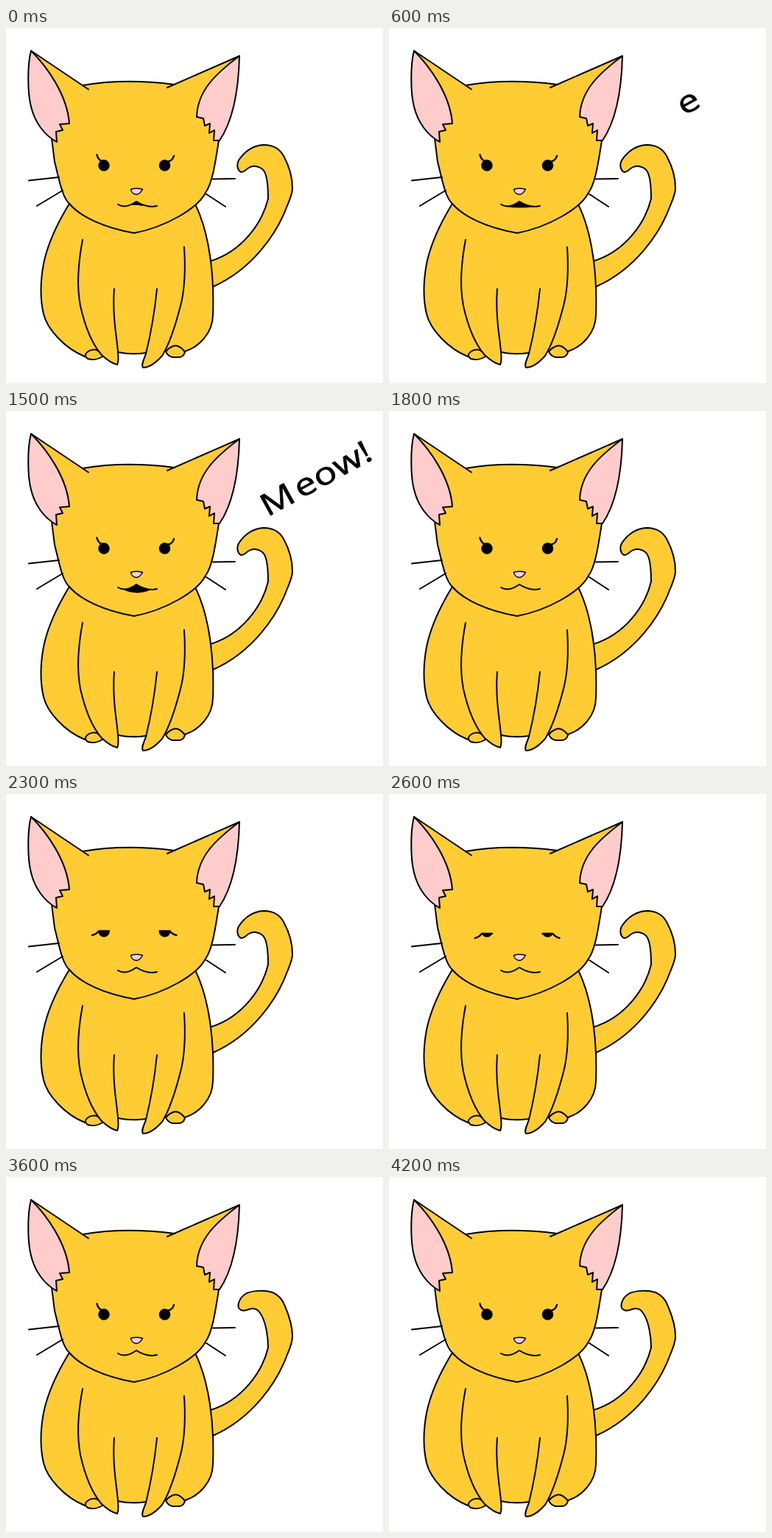
Recreate the animation shown at these times as an HTML page. Size 512 by 483 pixels, loop 4.5 s.

```html
<!DOCTYPE html>
<html lang="en">
<head>
<meta charset="utf-8">
<title>Meowing cat</title>
<style>
  html, body { margin: 0; width: 100%; height: 100%; overflow: hidden; background: #fff; }
  svg { display: block; width: 100vw; height: 100vh; }
  .line { fill: none; }
  .fur { fill: #fc3; }
  .pink { fill: #fcc; }
  text { font: 42px "Open Sans", "Noto Sans", sans-serif; fill: #000; stroke-width: .6; }
  tspan:first-child { letter-spacing: 4px; }
</style>
</head>
<body>
<svg viewBox="0 0 512 483" fill="none" stroke="#000" stroke-width="2" stroke-linecap="round" stroke-linejoin="round">
  <path id="tail" class="fur"/>

  <g id="body">
    <path class="fur" stroke="none" d="M86 239C72 262 57 291 51 321C46 348 47 372 51 389C56 410 80 436 107 447L131 447L152 441Q170 445 190 442L217 440L243 440C262 434 281 415 281 390C283 340 277 280 257 240Z"/>
    <path class="line" d="M86 239C72 262 57 291 51 321C46 348 47 372 51 389C56 410 80 436 107 447M152 441Q170 445 190 442M243 440C262 434 281 415 281 390C283 340 277 280 257 240"/>
    <path class="fur" d="M108 444C112 437 122 436 126 440Q130 443 131 447C125 451 117 452 111 450Q107 447 108 444Z"/>
    <path class="fur" d="M217 440C222 434 229 431 234 433Q240 436 243 441Q241 448 234 448L226 448Q219 446 217 440Z"/>
    <path class="fur" d="M104 288C97 325 96 352 101 378C107 405 117 430 130 445Q142 456 151 458C154 452 152 440 150 422C147 400 145 378 147 355"/>
    <path class="fur" d="M242 298C244 330 243 352 238 374C231 402 222 430 212 446C204 455 194 462 186 462C183 458 188 450 190 443C197 415 202 385 205 355"/>
  </g>

  <g id="head">
    <path class="fur" stroke="none" d="M104 78C145 71 190 72 229 77L317 38L289 153C284 185 280 212 271 224C260 246 216 271 174 279C134 272 101 257 86 239C76 230 72 205 66 182L62 150L34 31Z"/>
    <path class="line" d="M104 78C145 71 190 72 229 77M289 153C284 185 280 212 271 224C260 246 216 271 174 279C134 272 101 257 86 239C76 230 72 205 66 182L62 150"/>
    <path class="pink" d="M34 31C55 52 83 90 86 130L73 131L77 139L68 141L69 155C52 146 39 128 34 107C29 88 29 50 34 31Z"/>
    <path class="pink" d="M317 38C316 80 309 125 290 153L282 153L283 139L276 143L277 130L270 133L268 123L259 121C260 85 285 62 317 38Z"/>
    <path class="line" d="M34 31L112 83.5M317 38L219 81"/>
    <path class="line" d="M31 207.5L72 203M42 242L77 221M281 205.5L311 205M272 226L298 243"/>
    <path fill="#fcd" stroke-width="1.5" d="M169.5 219.5Q177 217 185.5 219.5C183 224 181 226.5 177 226.5C173 226 170 223 169.5 219.5Z"/>
    <path class="line" d="M152 240C160 245 170 241 177 236C185 241 194 245 205 242"/>
    <path id="mouth" fill="#000" stroke="none"/>
    <path id="eyes" fill="#000" stroke="none"/>
    <path id="lids" class="line" stroke-width="2.4"/>
  </g>

  <text id="word" transform="translate(355 144.5) rotate(-28.7) scale(1.23 1)"><tspan>M</tspan><tspan>e</tspan><tspan>o</tspan><tspan>w</tspan><tspan>!</tspan></text>
</svg>
<script>
const LOOP = 4500;
const $ = id => document.getElementById(id);
const letters = [...$('word').children];

const tailTips = {
  low: 'C356 215 355 201 350 194C344 187 335 187 330 190C325 193 323 197 319 196C314 193 313 186 316 180C322 171 333 160 350 159C363 159 372 165 377 174C383 185 389 202 389 218',
  high: 'C356 218 353 196 345 185C341 179 336 178 330 180C325 182 319 183 316 178C314 172 318 163 327 158C337 154 352 154 362 157C371 161 376 167 379 176C385 190 389 205 389 217'
};
const tail = tip => 'M278 317C320 304 348 266 356 232' + tailTips[tip] +
  'C389 226 385 234 381 244C368 279 335 328 281 352';

const mouths = {
  shut: '',
  small: 'M170 241L177 236L187 242Q182 242 180 241Z',
  mid: 'M163 243L177 236L191 243Q177 244.5 163 243Z',
  wide: 'M158 243Q170 242 177 236Q185 242 199 243Q178 246 158 243Z',
  full: 'M158 242.5Q170 242 177 236Q185 242 197 243Q178 252 158 242.5Z'
};

const R = 7.7, EYE_Y = 187, EYE_X = [133, 215.5];

// The part of an eye below the lid
function eye(x, lid) {
  const dy = lid - EYE_Y, w = Math.sqrt(R * R - dy * dy);
  return `M${x - w} ${lid}A${R} ${R} 0 ${dy < 0 ? 1 : 0} 0 ${x + w} ${lid}Z`;
}

// Lid edge with its lash; side is -1 for left, 1 for right
function lid(x, side, y, tip) {
  const at = d => x + side * d;
  return `M${at(-7)} ${y}L${at(7)} ${y}Q${at(11)} ${(y + tip) / 2 + (tip > y ? 2 : 1)} ${at(16)} ${tip}`;
}

const openLash = 'M130 181Q125 179 123.5 172.5M219 182Q226 181 228 174';

// Lid height and lash tip, from nearly open to closed
const blink = [[182.5, 179], [184.5, 186], [186.5, 192], [190, 196], [194, 199]];

// time, mouth, letters shown, blink step (-1 = open), tail
const steps = [
  [0, 'small', '', -1, 'low'],
  [300, 'mid', 'M', -1, 'low'],
  [600, 'wide', 'e', -1, 'low'],
  [900, 'wide', 'o', -1, 'low'],
  [1200, 'full', 'w!', -1, 'low'],
  [1500, 'full', 'Meow!', -1, 'low'],
  [1800, 'shut', '', -1, 'low'],
  ...[0, 1, 2, 3, 4, 3, 2, 1, 0].map((b, i) => [2100 + i * 100, 'shut', '', b, 'low']),
  [3000, 'small', '', -1, 'low'],
  [3300, 'mid', '', -1, 'low'],
  [3600, 'shut', '', -1, 'high'],
  [3900, 'shut', '', -1, 'low'],
  [4200, 'shut', '', -1, 'high']
];

function show([, mouth, text, b, tip]) {
  const open = b < 0;
  const [y, lash] = open ? [EYE_Y - R + 0.01] : blink[b];
  $('tail').setAttribute('d', tail(tip));
  $('mouth').setAttribute('d', mouths[mouth]);
  $('eyes').setAttribute('d', EYE_X.map(x => eye(x, y)).join(''));
  $('lids').setAttribute('d', open
    ? openLash
    : EYE_X.map((x, i) => lid(x, i ? 1 : -1, y, lash)).join(''));
  for (const l of letters) {
    l.style.visibility = text.includes(l.textContent) ? 'visible' : 'hidden';
  }
}

const start = performance.now();
let current;
function tick(now) {
  const t = Math.max(0, now - start) % LOOP;
  const step = steps.findLast(s => s[0] <= t);
  if (step !== current) show(current = step);
  requestAnimationFrame(tick);
}
tick(start);
</script>
</body>
</html>
```
